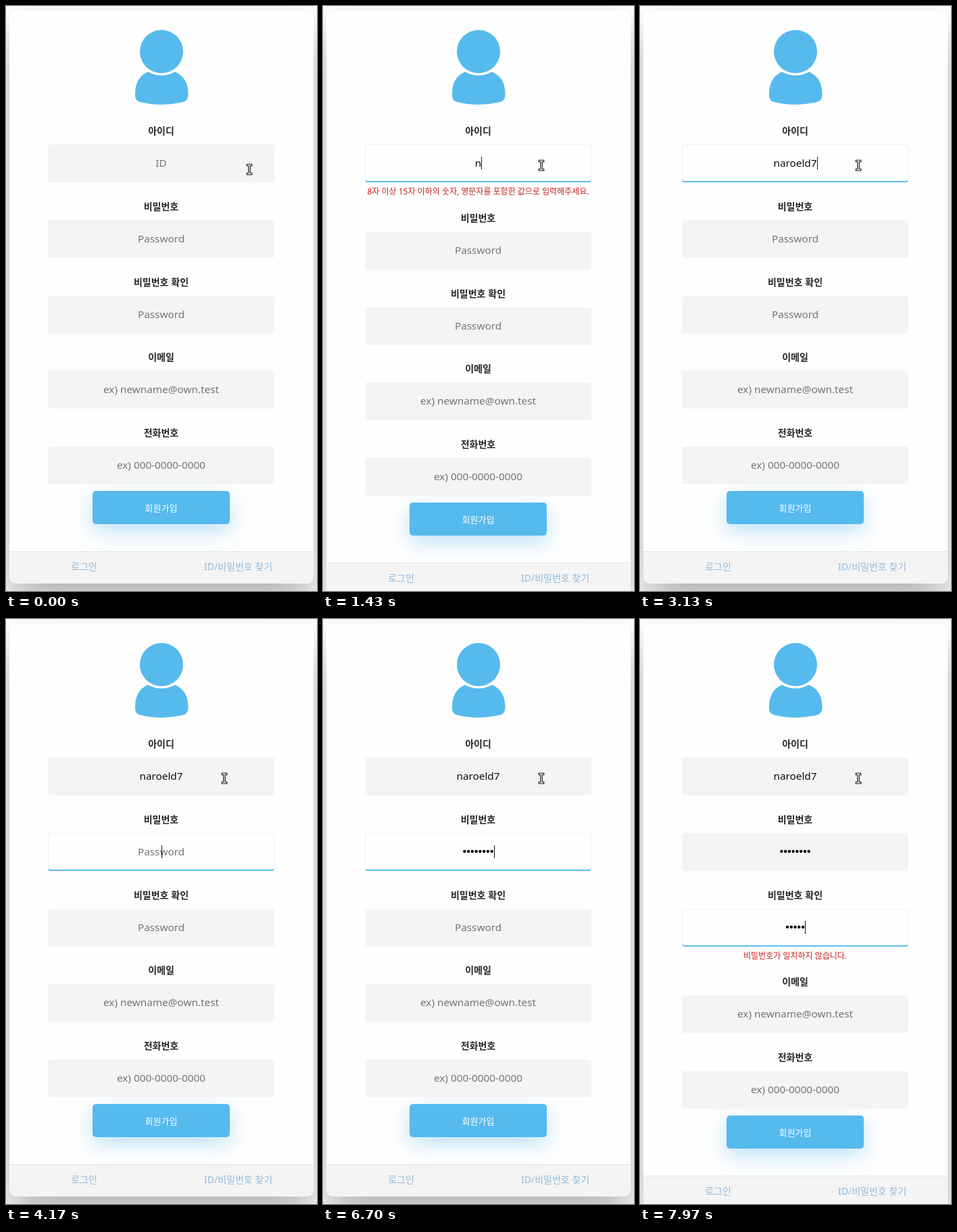
An HTML page for the animation above (8 s loop, 460 by 866 pixels).

```html
<!DOCTYPE html>
<html lang="ko">
<head>
<meta charset="utf-8">
<title>회원가입</title>
<style>
  html, body { margin: 0; width: 100%; height: 100%; overflow: hidden; background: #fff; }
  svg { display: block; width: 460px; height: 866px; }
  text { font: 14px "Noto Sans", "Noto Sans CJK KR", sans-serif; text-anchor: middle; }
  .card { fill: #fefefe; filter: drop-shadow(0 30px 30px rgba(0, 0, 0, .3)); }
  .blue { fill: #56baed; }
  .label { font: bold 14px "Noto Sans CJK KR", sans-serif; fill: #262626; }
  .hint, .value { font-size: 15.3px; }
  .hint { fill: #757575; }
  .value { fill: #0d0d0d; }
  .error { font-size: 12px; fill: #c8201c; }
  .box, .footer { fill: #f4f4f4; }
  .open { fill: #fefefe; stroke: #f0f0f0; }
  .line { fill: none; stroke: #5fbae9; stroke-width: 2; }
  .button { filter: drop-shadow(0 10px 15px rgba(95, 186, 233, .4)); }
  .button-text { font: 13px "Noto Sans CJK KR", sans-serif; fill: #fff; }
  .link { fill: #92badd; }
  .caret { fill: #111; }
  .cursor path { fill: none; stroke-linecap: square; }
</style>
</head>
<body>
<svg viewBox="0 0 460 866">
  <rect class="card" id="card" x="5" y="7" width="450" height="848" rx="10"/>
  <g class="blue">
    <circle cx="230" cy="67.5" r="32"/>
    <path d="M191 130C191 112 199 102 210 97.5Q230 108 250 97.5C261 102 269.5 112 269.5 130Q270 140 262 142Q246 146 230 146Q214 146 198 142Q190 140 191 130Z"/>
  </g>
  <g id="bottom">
    <rect class="blue button" x="128" y="718" width="203" height="49" rx="5"/>
    <text class="button-text" x="229.5" y="748">회원가입</text>
    <path class="footer" d="M5 807H455V845a10 10 0 0 1 -10 10H15a10 10 0 0 1 -10 -10Z"/>
    <path stroke="#dce8f1" d="M5 807.5H455"/>
    <text class="link" x="115.5" y="835">로그인</text>
    <text class="link" x="343.5" y="835">ID/비밀번호 찾기</text>
  </g>
  <g id="fields"></g>
  <g class="cursor" id="cursor">
    <path stroke="#111" stroke-width="3.6" d="M-2.5 -6.5H2.5M0 -6.5V6.5M-2.5 6.5H2.5"/>
    <path stroke="#fff" stroke-width="1.3" d="M-2.5 -6.5H2.5M0 -6.5V6.5M-2.5 6.5H2.5"/>
  </g>
</svg>
<script>
const LOOP = 8000, CENTER = 229.5, TOP = 205, PITCH = 111.75;
const ERROR_HEIGHT = 17, FADE = 500, NEEDED = 8, DOT = 5.75;
const rule = '8자 이상 15자 이하의 숫자, 영문자를 포함한 값으로 입력해주세요.';
const fields = [
  { label: '아이디', hint: 'ID', error: rule, text: 'naroeld7', focus: 700, blur: 3650, start: 1425, step: 243 },
  { label: '비밀번호', hint: 'Password', error: rule, focus: 3650, blur: 6960, start: 4895, step: 257 },
  { label: '비밀번호 확인', hint: 'Password', error: '비밀번호가 일치하지 않습니다.', focus: 6960, blur: Infinity, start: 7200, step: 190 },
  { label: '이메일', hint: 'ex) newname@own.test' },
  { label: '전화번호', hint: 'ex) 000-0000-0000' }
];
const byId = id => document.getElementById(id);
const clamp = x => Math.min(1, Math.max(0, x));
const ease = x => { x = clamp(x); return x * x * (3 - 2 * x); };
const moveY = (node, y) => node.setAttribute('transform', `translate(0 ${y})`);
const show = (node, on) => node.setAttribute('visibility', on ? 'visible' : 'hidden');

for (const field of fields) {
  const g = document.createElementNS('http://www.w3.org/2000/svg', 'g');
  g.innerHTML = `
    <text class="label" x="${CENTER}" y="-15">${field.label}</text>
    <rect class="box" x="62" width="335" height="56" rx="4"/>
    <g class="focus">
      <rect class="open" x="62.5" y=".5" width="334" height="55" rx="4"/>
      <path class="line" d="M63 53.5Q64 55 66 55H393Q395 55 396 53.5"/>
    </g>
    <text class="hint" x="${CENTER}" y="33">${field.hint}</text>
    <text class="value" x="${CENTER}" y="33"></text>
    <g class="dots"></g>
    <rect class="caret" y="18" width="1" height="19"/>
    <text class="error" x="${CENTER}" y="73.5">${field.error || ''}</text>`;
  byId('fields').append(g);
  field.group = g;
  for (const name of ['focus', 'hint', 'value', 'dots', 'caret', 'error']) {
    field[name + 'Node'] = g.querySelector('.' + name);
  }
}

function setValue(field, count) {
  if (field.count === count) return;
  field.count = count;
  if (field.text) {
    field.valueNode.textContent = field.text.slice(0, count);
    field.width = count ? field.valueNode.getComputedTextLength() : 0;
  } else {
    field.width = count * DOT;
    field.dotsNode.innerHTML = Array.from({ length: count }, (_, i) =>
      `<circle cx="${CENTER - field.width / 2 + (i + .5) * DOT}" cy="27" r="2.2"/>`).join('');
  }
}

function drawField(field, t, y) {
  const count = field.start && t >= field.start
    ? Math.min(NEEDED, 1 + Math.floor((t - field.start) / field.step)) : 0;
  const focused = t >= field.focus && t < field.blur;
  const lastInput = count ? field.start + (count - 1) * field.step : field.focus;
  const wrong = count > 0 && count < NEEDED;
  setValue(field, count);
  moveY(field.group, y);
  field.focusNode.setAttribute('opacity', field.focus
    ? ease((t - field.focus) / FADE) - ease((t - field.blur) / FADE) : 0);
  show(field.hintNode, !count);
  show(field.errorNode, wrong);
  show(field.caretNode, focused && (t - lastInput) % 1200 < 600);
  field.caretNode.setAttribute('x', Math.round(CENTER + field.width / 2));
  return wrong;
}

function draw(t) {
  let shift = 0;
  fields.forEach((field, i) => {
    if (drawField(field, t, Math.round(TOP + PITCH * i) + shift)) shift += ERROR_HEIGHT;
  });
  moveY(byId('bottom'), shift);
  byId('card').setAttribute('height', 848 + shift);
  const k = ease((t - 60) / 560);
  byId('cursor').setAttribute('transform', `translate(${360 - 37 * k} ${242 - 6 * k})`);
}

const begin = performance.now();
function tick() {
  draw((performance.now() - begin) % LOOP);
  requestAnimationFrame(tick);
}
tick();
</script>
</body>
</html>
```
